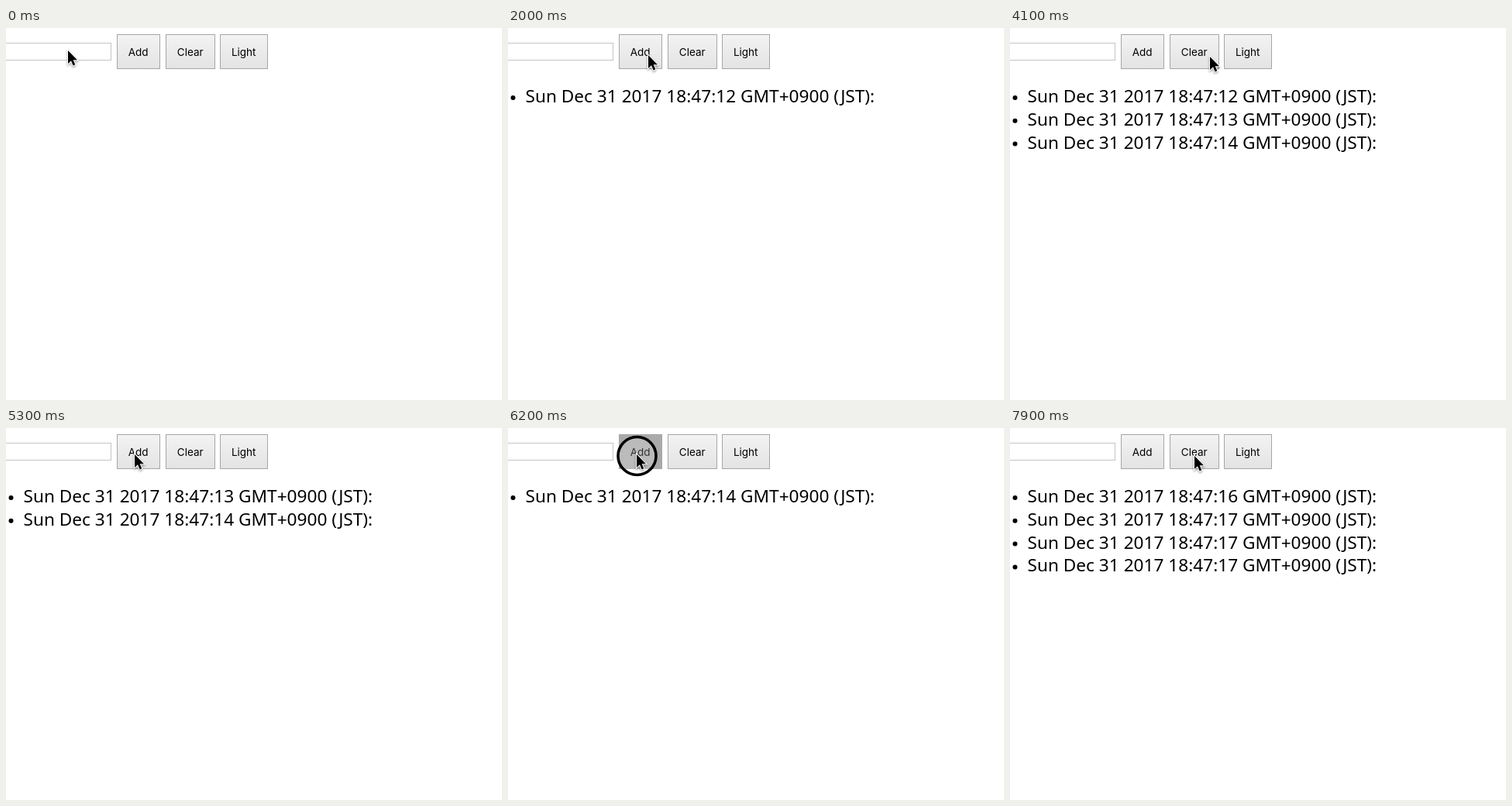
Recreate the animation shown at these times as an HTML page with a canvas. Size 640 by 480 pixels, loop 8000 ms.

```html
<!DOCTYPE html>
<html lang="en">
<meta charset="utf-8">
<title>Timed list</title>
<style>
  html, body { margin: 0; width: 100%; height: 100%; overflow: hidden; background: #fff; }
  canvas { display: block; }
</style>
<canvas id="stage" width="640" height="480"></canvas>
<script>
const ctx = document.getElementById('stage').getContext('2d');
const LOOP = 8000, STEP = 100, LIFETIME = 3700, QUEUE = 3;
const arrow = new Path2D('M0 0V17L4 13.3L6.6 19.5L9.3 18.3L6.7 12.3H12Z');
const buttonWidths = { Add: 56, Clear: 64, Light: 62 };

// Slow clicks on Add, then a quick burst of four.
const press = (at, hold) => ({ at, hold });
const adds = [1100, 2200, 3000].map(at => press(at, 200));
for (let k = 0; k < 4; k++) adds.push(press(5600 + 200 * k, 100));
const clicks = [press(200, 200), ...adds];

// The burst waits until the first items have expired.
const drained = adds[QUEUE - 1].at + 200 + LIFETIME;
const items = adds.map(({ at }, i) => {
  const stamp = at + 200;
  const shown = i < QUEUE ? stamp : drained;
  return { second: Math.floor(11 + stamp / 1000), shown, gone: shown + LIFETIME };
});

function pointerAt(t) {
  let x = 80, y = 29;
  const glide = (start, end, tx, ty) => {
    const p = Math.min(1, Math.max(0, (t - start) / (end - start)));
    const eased = p * p * (3 - 2 * p);
    x += (tx - x) * eased;
    y += (ty - y) * eased;
  };
  glide(500, 1000, 181, 35);
  glide(3300, 4100, 258, 37);
  glide(4900, 5300, 166, 34);
  glide(7600, 7900, 238, 36);
  return [x, y];
}

function drawControls(addDown) {
  ctx.lineWidth = 1;
  ctx.strokeStyle = '#c4c4c4';
  ctx.strokeRect(-9.5, 19.5, 145, 22);
  ctx.font = '13.5px Inter, sans-serif';
  ctx.textAlign = 'center';
  const face = ctx.createLinearGradient(0, 8, 0, 53);
  face.addColorStop(0, '#f3f3f3');
  face.addColorStop(1, '#e3e3e3');
  let x = 143;
  for (const [label, width] of Object.entries(buttonWidths)) {
    const left = Math.round(x);
    ctx.fillStyle = addDown && label === 'Add' ? '#aaa' : face;
    ctx.fillRect(left, 8, width, 45);
    ctx.strokeStyle = '#a6a6a6';
    ctx.strokeRect(left + 0.5, 8.5, width - 1, 44);
    ctx.fillStyle = '#000';
    ctx.fillText(label, left + width / 2 - 0.3, 36);
    x += width + 6.5;
  }
}

function drawItem({ second }, row) {
  const y = 96 + row * 29.8;
  ctx.fillStyle = '#000';
  ctx.beginPath();
  ctx.arc(6.5, y - 6, 3, 0, 7);
  ctx.fill();
  ctx.font = '22.65px "Noto Sans", sans-serif';
  ctx.textAlign = 'left';
  ctx.fillText(`Sun Dec 31 2017 18:47:${second} GMT+0900 (JST):`, 22.5, y);
}

function drawRing(x, y) {
  ctx.beginPath();
  ctx.arc(x + 0.5, y + 2, 24.5, 0, 7);
  ctx.fillStyle = 'rgba(255,255,255,.2)';
  ctx.fill();
  ctx.lineWidth = 3.6;
  ctx.strokeStyle = '#000';
  ctx.stroke();
}

function drawPointer(x, y) {
  ctx.save();
  ctx.translate(x, y);
  ctx.shadowColor = 'rgba(0,0,0,.4)';
  ctx.shadowBlur = 3;
  ctx.shadowOffsetY = 1.5;
  ctx.lineWidth = 2;
  ctx.strokeStyle = '#fff';
  ctx.stroke(arrow);
  ctx.shadowColor = 'transparent';
  ctx.fillStyle = '#000';
  ctx.fill(arrow);
  ctx.restore();
}

function draw(now) {
  const t = Math.floor(now % LOOP / STEP) * STEP;
  const click = clicks.find(({ at, hold }) => t >= at && t < at + hold);
  const [x, y] = pointerAt(t);
  ctx.fillStyle = '#fff';
  ctx.fillRect(0, 0, 640, 480);
  // The button darkens for the last step of a click.
  drawControls(click && x > 143 && t >= click.at + click.hold - STEP);
  items.filter(({ shown, gone }) => t >= shown && t < gone).forEach(drawItem);
  if (click) drawRing(x, y);
  drawPointer(x, y);
}

const begin = performance.now();
function frame() {
  draw(performance.now() - begin);
  requestAnimationFrame(frame);
}
frame();
</script>
</html>
```
